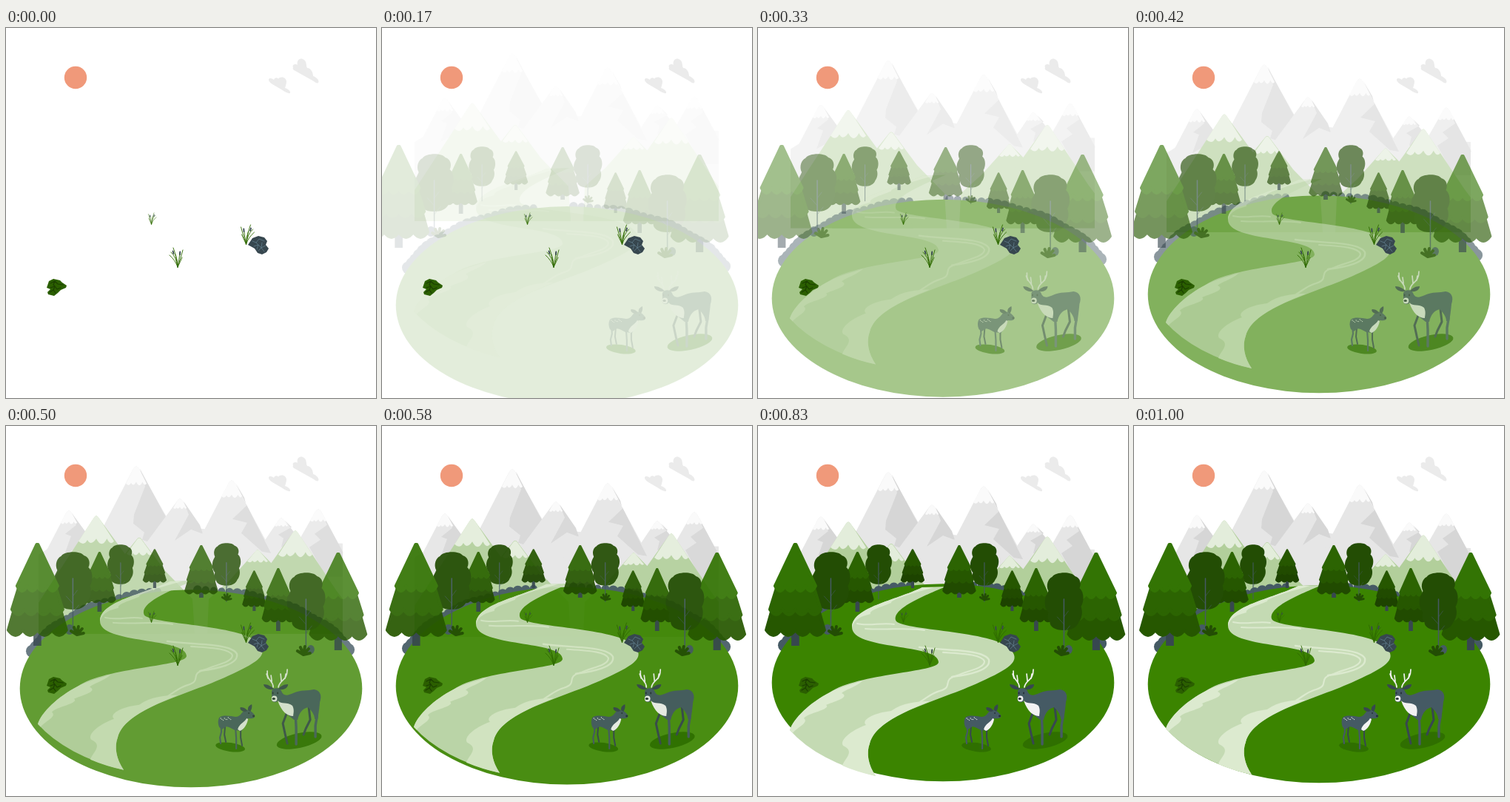
Recreate the animation shown at these times as an HTML page. Size 500 by 500 pixels, loop 1.04 s.

```html
<!DOCTYPE html>
<html lang="en">
<head>
<meta charset="utf-8">
<title>Valley with deer</title>
<style>
html, body { margin: 0; width: 100%; height: 100%; overflow: hidden; background: #fff; }
svg { display: block; width: 100vw; height: 100vh; }
</style>
</head>
<body>
<svg id="stage" viewBox="0 0 500 500"></svg>
<script>
const SLATE = '#455a64', DARK = '#37474f', LEAF = '#234d04';

// Shape helpers returning SVG markup
const fill = (d, c) => `<path d="${d}" fill="${c}"/>`;
const line = (d, c, w) => `<path d="${d}" fill="none" stroke="${c}" stroke-width="${w}" stroke-linecap="round" stroke-linejoin="round"/>`;
const oval = (x, y, rx, ry, c, turn = 0) =>
  `<ellipse cx="${x}" cy="${y}" rx="${rx}" ry="${ry}" fill="${c}" transform="rotate(${turn} ${x} ${y})"/>`;
const at = (x, y, s, body) => `<g transform="translate(${x} ${y}) scale(${s})">${body}</g>`;
const group = (id, body) => `<g id="${id}">${body}</g>`;

const PINE = ['#337404', '#2c6402', '#265700', '#214b00', '#1d4300'];

function pine(x, top, half, bottom, foot, tone = 0) {
  const h = bottom - top, tw = half * .13;
  let out = fill(`M${x - tw} ${bottom - 8}H${x + tw}V${foot}H${x - tw}Z`, DARK);
  // Each tier: top and bottom height, top and bottom half width
  const tiers = [[.66, .92, .74, .96], [.4, .7, .56, .84], [0, .45, .02, .67]];
  tiers.forEach(([from, to, narrow, wide], i) => {
    const n = half * narrow, w = half * wide, y = top + h * to, step = w / 2;
    const color = PINE[tone + 2 - i];
    let d = `M${x - n} ${top + h * from + 1}H${x + n}L${x + w} ${y}`;
    for (let k = 0; k < 4; k++) d += `q${-step / 2} ${h * .11} ${-step} 0`;
    out += `<path d="${d}Z" fill="${color}" stroke="${color}" stroke-width="${half * .1}" stroke-linejoin="round"/>`;
  });
  return out;
}

const roundTree = (x, y, s) => at(x, y, s,
  fill('M0 78C-13 78-19 73-19 67C-23 63-22 58-21 54C-25 50-27 42-25 34C-24 30-22 28-21 25C-25 17-21 8-16 6C-12-1 10-2 15 5C22 7 24 15 21 21C28 27 27 40 23 46C26 54 24 62 20 67C17 75 9 78 0 78Z', LEAF) +
  line('M0 36V107', SLATE, 1.5) + line('M0 70L-9 60M0 60L6 52M0 82L8 72', SLATE, .6));

const shrub = (x, y, s) => at(x, y, s,
  line('M0 0L-8-5M0 0L-4-10M0 0L2-11M0 0L7-8M0 0L9-2', LEAF, 4));

const cattail = (x, y, s) => at(x, y, s,
  line('M0 0Q-3-9-11-16M0 0Q-2-14-9-20M0 0Q-2-16-6-26M0 0Q0-10-3-17M0 0Q2-10 3-19M0 0Q4-12 7-23M0 0Q4-8 6-13', '#2f6a00', .9) +
  line('M-6.5-21.5L-5.5-18M3.2-20.5L3-17', DARK, 1.8));

function mountains() {
  const grey = '#e6e6e6', shade = '#d6d6d6', snow = '#fafafa', hill = '#b2cf9b', frost = '#e3eddb';
  const peak = (x, y, l, r, base) => fill(`M${l} ${base}L${x - 4} ${y + 4}Q${x} ${y - 3} ${x + 4} ${y + 4}L${r} ${base}Z`, grey);
  const cap = (x, y, w, h, c) => fill(
    `M${x - w} ${y + h}L${x - 4} ${y + 4}Q${x} ${y - 3} ${x + 4} ${y + 4}L${x + w} ${y + h}` +
    `q${-w * .2} ${h * .18} ${-w * .4} ${-h * .1}q${-w * .3} ${h * .4} ${-w * .6} 0q${-w * .3} ${h * .3} ${-w * .5} ${h * .05}q${-w * .2} ${h * .25} ${-w * .5} ${h * .05}Z`, c);
  return fill('M44 180L60 170L130 155L200 165L265 145L350 160L455 165V287H44Z', grey) +
    peak(85, 120, 44, 135, 195) +
    fill('M89 124L95 140L80 152L88 155L79 180L104 166L128 188L108 150Z', shade) + cap(85, 120, 11, 17, snow) +
    peak(176, 60, 112, 246, 180) +
    fill('M181 64L188 88L173 126L172 138L187 150L184 160L215 170L240 170L212 122Z', shade) + cap(176, 60, 14, 24, snow) +
    peak(235, 104, 180, 285, 177) +
    fill('M240 108L247 126L228 161L250 146L266 152L262 140Z', shade) + cap(235, 104, 9, 13, snow) +
    peak(372, 130, 340, 412, 175) +
    fill('M377 134L386 143L368 153L375 158L372 170L400 165Z', shade) + cap(372, 130, 9, 11, snow) +
    peak(422, 118, 386, 456, 178) +
    fill('M426 122L434 140L417 152L425 160L410 170L432 210H455V176Z', shade) + cap(422, 118, 11, 16, snow) +
    peak(305, 79, 248, 364, 185) +
    fill('M310 83L322 103L325 114L306 132L326 137L318 151L346 176L358 178Z', shade) + cap(305, 79, 14, 22, snow) +
    fill('M148 195L177 159Q180 155 183 159L215 202L252 240L255 287H100Z', hill) + cap(180, 157, 17, 22, frost) +
    fill('M44 287V245L119 130Q122 125 125 130L176 200L210 287Z', hill) + cap(122, 127, 24, 35, frost) +
    fill('M272 287L274 240L302 215L337 176Q340 171 343 176L372 205L400 287Z', hill) + cap(340, 173, 14, 16, frost) +
    fill('M320 245L388 150Q391 145 394 150L446 228L455 240V287H320Z', hill) + cap(391, 147, 23, 33, frost);
}

function ground() {
  let out = '';
  for (let deg = 22; deg <= 158; deg += 2.7) {
    if (deg > 80 && deg < 90) continue;
    const a = deg * Math.PI / 180, side = Math.abs(Math.cos(a));
    const r = 5 + 4.2 * side + Math.sin(deg * 5);
    out += oval(250 - 231 * Math.cos(a), 348 - 133 * Math.sin(a), r, r, SLATE);
  }
  return out + oval(250, 348.7, 231.3, 133.5, '#3b8400');
}

function river() {
  const light = '#dceacf';
  return fill('M222 216C185 234 127 243 127 270C127 301 244 292 244 317C244 331 135 332 97 358C70 372 48 393 43 409A231 133.5 0 0 0 159 471C149 456 146 440 151 427C162 387 245 370 300 344C340 326 354 316 343 302C328 275 200 275 187 262C178 246 225 227 254 215Z', '#c4dab3') +
    fill('M222 216C185 234 127 243 127 270C131 258 140 255 152 252C150 247 165 243 180 237C178 233 210 224 238 216Z', light) +
    fill('M43 409C48 393 70 372 97 358C110 351 126 347 142 342C130 352 118 354 113 359C126 365 100 371 92 375C100 381 66 386 62 393C70 399 50 407 47 413Z', light) +
    fill('M159 471C149 456 146 440 151 427C155 411 171 399 192 388C205 381 220 375 232 370C215 370 195 372 180 383C154 386 139 396 146 402C124 410 110 423 115 430C132 438 117 447 114 457Q135 466 159 471Z', light) +
    line('M134 265C150 269 168 263 184 266M145 272C175 274 205 270 225 274', light, 2) +
    line('M218 297C250 302 304 299 312 314C315 328 286 334 262 337', light, 2.4) +
    line('M250 304C280 306 302 307 306 316C306 326 282 329 270 335C246 341 266 350 246 356C235 359 230 364 219 371', light, 2.2);
}

function trees() {
  return pine(207, 166, 16, 212, 219, 2) + roundTree(161, 160, .69) +
    pine(132.5, 170, 22, 240, 251, 1) + roundTree(96.5, 170, 1) +
    oval(92, 275, 6, 7, SLATE) + shrub(102, 282, 1) + pine(48.5, 159, 41, 286, 297) +
    pine(270, 161, 22.5, 228, 232, 1) + roundTree(304, 158, .74) + shrub(304, 235, .7) +
    pine(341.5, 195, 16, 245, 250, 2) + pine(374, 192, 22, 266, 277, 1) +
    pine(455, 172, 39, 291, 303) + roundTree(411.5, 198, 1) +
    oval(418, 302, 5, 6, SLATE) + shrub(408, 309, 1);
}

function deer() {
  const white = '#f2f2f2', shadow = '#2f6f00', black = '#263238';
  const adult =
    oval(390, 425, 31, 10, shadow, -12) +
    line('M403 380L405 397L399 409L396 417M374 386L368 402L371 416L374 429', DARK, 3) +
    line('M385 388L386 408L386 430M414 372L414 393L412 405L412 420', SLATE, 3.4) +
    fill('M353 358C355 353 364 353 366 358C369 366 375 364 382 361C392 356 402 358 410 356C419 357 421 365 418 373C417 384 416 390 415 396L411 396C411 389 405 383 402 380C395 382 390 387 388 397L383 397C374 390 365 383 362 371C360 374 353 374 353 370Z', SLATE) +
    fill('M361 371C366 377 374 372 381 378C384 384 382 389 382 392C374 392 366 386 361 371Z', white) +
    fill('M354 356C348 357 342 353 342 349C348 349 352 352 356 355ZM364 356C371 357 375 353 375 349C369 349 365 352 362 355Z', DARK) +
    line('M355 353C355 343 346 345 347 331M353 345L352 337M348 341L346 335', white, 1.7) +
    line('M362 353C363 343 374 345 374 329M366 345L365 335M371 341L372 335', white, 1.7) +
    oval(356.5, 368.5, 3.8, 4, white) + oval(355.7, 368.5, 2.2, 1.6, black) +
    oval(354.5, 361, 1, 1.4, black) + oval(361, 361, 1, 1.4, black);
  const fawn =
    oval(297, 434, 20, 6, shadow, 8) +
    line('M290 405L289 417L291 427M311 409L311 421L313 432', DARK, 2) +
    line('M284 401L285 413L283 421L284 429M304 408L305 422L305 436', SLATE, 2.2) +
    fill('M282 394C287 390 297 392 304 393C310 393 312 388 315 385C320 381 327 386 330 391C331 395 326 396 321 395C319 403 315 408 312 412L303 411C297 408 293 405 290 407L286 410L282 407C280 402 280 398 282 394Z', SLATE) +
    fill('M319 395C316 401 309 402 307 410L310 412C316 410 320 402 321 396Z', white) +
    fill('M317 386C311 386 309 381 311 380C316 380 319 383 320 385ZM321 384C320 379 324 377 326 376C327 381 325 384 324 386Z', DARK) +
    oval(328.5, 392, 1.6, 1.4, black) + oval(322, 388, 1, 1, black);
  let spots = '';
  for (let i = 0; i < 9; i++) spots += oval(284 + i * 1.7, 395 + (i % 3) * 1.3 - (i > 4), .65, .65, white);
  return adult + fawn + spots;
}

function still() {
  return oval(94, 67, 15.2, 15.2, '#f0997a') +
    fill('M388 53C386 49 392 48 394 50C392 43 398 39 403 43C407 47 405 50 407 54C412 54 415 60 415 65C419 66 424 71 422 74C421 75 418 74 416 72L391 58C388 57 387 55 388 53Z', '#ebebeb') +
    fill('M355 70C355 67 360 68 362 70C363 66 368 67 368 69C370 65 378 66 379 72C379 75 378 78 377 81C380 82 385 85 384 88C381 89 375 85 372 83L360 76C357 74 355 72 355 70Z', '#ebebeb') +
    fill('M58 342L64 339L73 341L76 344L82 348L81 351L74 354L70 358L65 362L57 360L56 357L60 353L55 351Z', '#2b5f00') +
    line('M60 345L66 342L70 346L77 347M60 351L66 349L69 353L74 351M59 357L64 354L67 358M66 342L64 347L66 349L64 354', '#1b3f00', 1.2) +
    fill('M327 293L333 284L341 281L349 283L353 288L351 293L355 298L352 303L346 306L340 304L336 298Z', DARK) +
    line('M333 288L338 290L342 285L349 288M335 295L341 293L345 297L351 294M341 301L345 297L349 302M338 290L341 293L339 299M346 290L345 297', '#607d8b', .8) +
    cattail(196.5, 265, '-.58 .58') + cattail(232, 323, 1) + cattail(324.5, 292, '-1 1');
}

const stage = document.getElementById('stage');
stage.innerHTML = group('mountains', mountains()) + group('ground', ground()) +
  group('river', river()) + group('trees', trees()) + group('deer', deer()) + still();

// Direction each layer slides in from
const slides = { mountains: [0, -1], ground: [0, 1], river: [0, -1], trees: [-1, 0], deer: [1, 0] };
const layers = Object.entries(slides).map(([id, dir]) => [document.getElementById(id), dir]);

const LOOP = 1040, FPS = 24, LEAD = 28, TRAVEL = 30;
const bezier = (u, a, b) => 3 * (1 - u) ** 2 * u * a + 3 * (1 - u) * u * u * b + u ** 3;

// cubic-bezier(.36, -.01, .5, 1.38)
function ease(x) {
  if (x >= 1) return 1;
  let lo = 0, hi = 1;
  for (let i = 0; i < 24; i++) {
    const mid = (lo + hi) / 2;
    if (bezier(mid, .36, .5) < x) lo = mid; else hi = mid;
  }
  return bezier(lo, -.01, 1.38);
}

function draw(now) {
  const tick = Math.floor((now % LOOP + 5) * FPS / 1000);
  const p = tick ? ease(tick / FPS + LEAD / 1000) : 0, gap = TRAVEL * (1 - p);
  for (const [el, [dx, dy]] of layers) {
    el.setAttribute('transform', `translate(${dx * gap} ${dy * gap})`);
    el.setAttribute('opacity', Math.min(1, Math.max(0, p)));
  }
}

const start = performance.now();
function loop() {
  draw(performance.now() - start);
  requestAnimationFrame(loop);
}
loop();
</script>
</body>
</html>
```
